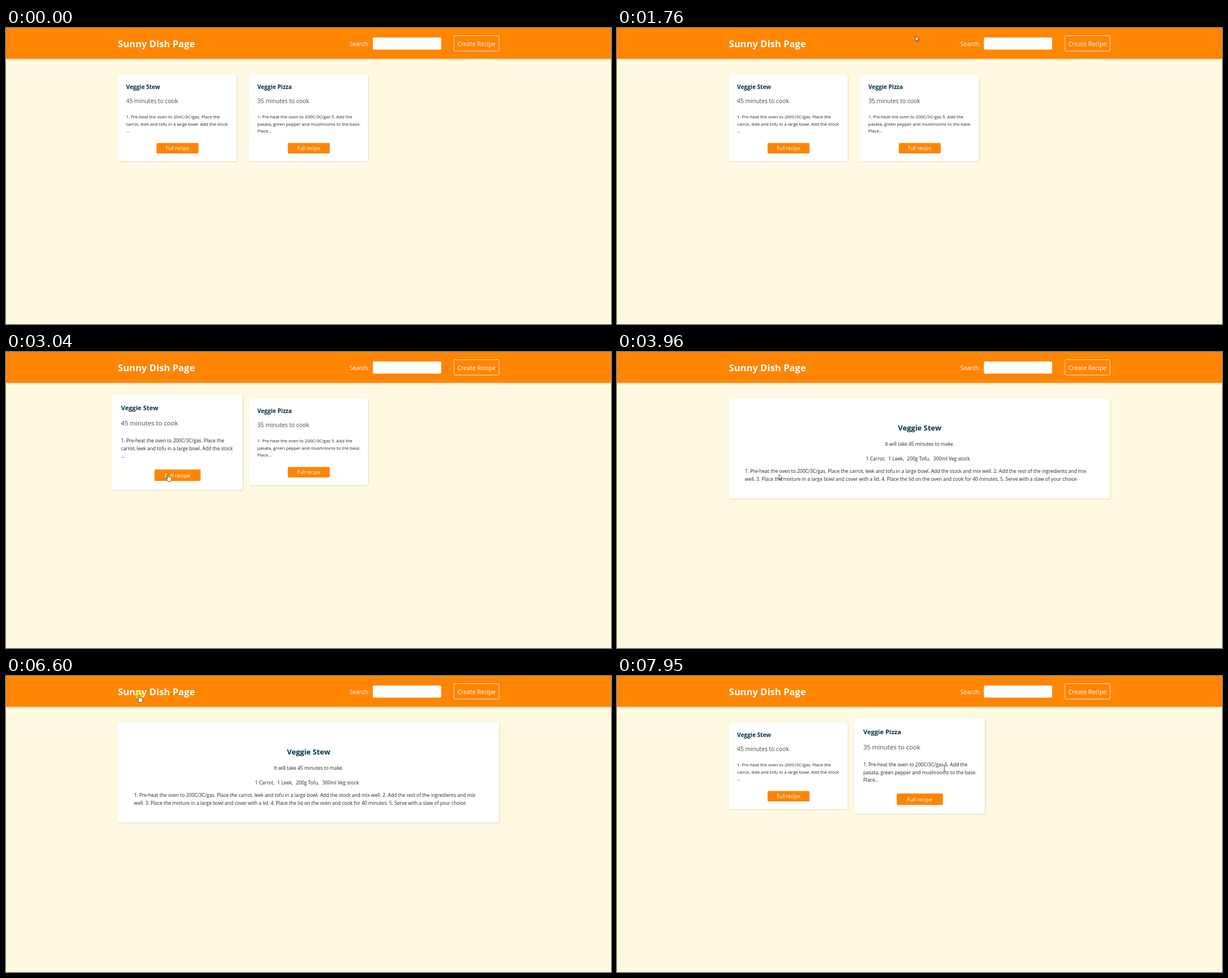
Recreate the animation shown at these times as an HTML page. Size 1068 px wide and 524 px high, loop 8 s.

```html
<!DOCTYPE html>
<html lang="en">
<head>
<meta charset="utf-8">
<title>Recipes</title>
<style>
html, body { margin: 0; width: 100%; height: 100%; overflow: hidden; background: #fef9e0; }
svg { display: block; width: 100%; height: 100%; font-family: "Open Sans", "Noto Sans", sans-serif; }
text { white-space: pre; }
.panel { fill: #fff; filter: drop-shadow(1px 1px 1.3px rgba(0, 0, 0, .13)); }
.bar { fill: #ff8503; filter: drop-shadow(0 1px 1px rgba(0, 0, 0, .1)); }
.white { fill: #fff; }
.heading { fill: #023047; font-weight: 700; }
.soft { fill: #484848; }
.body { fill: #222; }
</style>
</head>
<body>
<svg viewBox="0 0 1068 524" preserveAspectRatio="none">
  <rect width="1068" height="524" fill="#fef9e0"/>
  <rect class="bar" width="1068" height="54.6"/>
  <g class="white">
    <text x="197.5" y="34" font-size="16.6" font-weight="700">Sunny Dish Page</text>
    <text x="606.3" y="31.8" font-size="10.4">Search:</text>
    <rect x="647.6" y="16.7" width="120.6" height="21.6" rx="2"/>
    <text x="830.6" y="31.8" font-size="10.55" text-anchor="middle">Create Recipe</text>
  </g>
  <rect x="790.8" y="13.6" width="79.6" height="27.3" rx="1.8" fill="none" stroke="#fff" stroke-width=".8"/>
  <g id="list"></g>
  <g id="recipe">
    <rect id="sheet" class="panel" x="197.7" y="83" width="672.8" rx="2.5"/>
    <g id="details" class="body" font-size="8.5"></g>
  </g>
  <circle id="click" r="7" fill="#ffe000" opacity=".65"/>
  <g id="cursor" stroke-linejoin="round">
    <path id="arrow" d="M0 0V9.2L2.1 7.3L3.5 10.5L5 9.9L3.6 6.8H6.4Z" fill="#fff" stroke="#222" stroke-width=".75"/>
    <path id="hand" d="M-1 .8Q0 -.6 1 .8V4.5Q2.2 3.8 2.8 4.9Q4 4.3 4.5 5.4Q6 5 6 6.6V9.4Q5.6 11 5 12.8H-.2Q-1 11 -3.4 8.2Q-3.4 6.8 -1 8.4Z" fill="#fff" stroke="#222" stroke-width=".75"/>
    <path id="beam" d="M-2 -5H-.6L0 -4.5L.6 -5H2M0 -4.5V4.5M-2 5H-.6L0 4.5L.6 5H2" fill="none" stroke="#333" stroke-width=".85"/>
  </g>
</svg>
<script>
const LOOP = 8000;
const $ = id => document.getElementById(id);
const show = (node, on) => { node.style.display = on ? "" : "none"; };
const text = (x, y, content, attrs = "") => `<text x="${x}" y="${y}" ${attrs}>${content}</text>`;

function card(id, x, title, minutes, lines) {
  const left = x + 14.3;
  return `<g id="${id}">
    <rect class="panel" x="${x}" y="83" width="209.5" height="153" rx="2.5"/>
    ${text(left, 108.2, title, 'class="heading" font-size="10.15"')}
    ${text(left, 132.8, minutes + " minutes to cook", 'class="soft" font-size="10.3"')}
    ${lines.map((line, i) => text(left, 160.3 + i * 12.2, line, 'class="body" font-size="7.72"')).join("")}
    <rect x="${x + 68.1}" y="203.6" width="74" height="18.5" rx="1.7" fill="#ff8503"/>
    ${text(x + 104.9, 216.2, "Full recipe", 'class="white" font-size="8.6" text-anchor="middle"')}
  </g>`;
}

$("list").innerHTML =
  card("stew", 197.7, "Veggie Stew", 45, [
    "1. Pre-heat the oven to 200C/3C/gas. Place the",
    "carrot, leek and tofu in a large bowl. Add the stock",
    "..."]) +
  card("pizza", 429.4, "Veggie Pizza", 35, [
    "1. Pre-heat the oven to 200C/3C/gas 5. Add the",
    "pasata, green pepper and mushrooms to the base.",
    "Place..."]);

$("details").innerHTML =
  text(534.3, 139, "Veggie Stew", 'class="heading" font-size="12.95" text-anchor="middle"') +
  text(534.2, 166.3, "It will take 45 minutes to make.", 'text-anchor="middle"') +
  text(439.6, 191.6, "1 Carrot,") + text(479, 191.6, "1 Leek,") +
  text(511.8, 191.6, "200g Tofu,") + text(558.6, 191.6, "300ml Veg stock") +
  text(225.8, 213.6, "1. Pre-heat the oven to 200C/3C/gas. Place the carrot, leek and tofu in a large bowl. Add the stock and mix well. 2. Add the rest of the ingredients and mix") +
  text(225.8, 228.2, "well. 3. Place the mixture in a large bowl and cover with a lid. 4. Place the lid on the oven and cook for 40 minutes. 5. Serve with a slaw of your choice");

const arrow = () => "arrow";

// Each move jumps through evenly timed stops along a polyline, then rests.
const moves = [
  { start: 350, end: 550, stops: 5, path: [[1013, 497], [824, 243]], shape: arrow },
  { start: 880, end: 1280, stops: 9, path: [[815, 239], [504, 78]], shape: arrow },
  { start: 1470, end: 1520, stops: 2, path: [[512, 50], [532, 2]], shape: arrow },
  { start: 1570, hidden: true },
  { start: 1760, end: 2530, stops: 17, path: [[527, 14], [293, 177]], shape: arrow },
  { start: 2580, end: 3040, stops: 10, path: [[293, 180], [286, 216.5]],
    shape: (x, y, t) => y > 207 && t < 3580 ? "hand" : "arrow" },
  { start: 4860, end: 5010, stops: 4, path: [[262, 188], [130, 37]], shape: arrow },
  { start: 5360, end: 5970, stops: 14, path: [[128, 34], [122, 27], [150, 21], [200, 25], [235, 34]],
    shape: x => x > 197 ? "hand" : "arrow" },
  { start: 7360, end: 7950, stops: 13, path: [[237, 35], [578, 163]],
    shape: (x, y) => y < 41 ? "hand" : x > 435 && y > 150 ? "beam" : "arrow" }
];

// Hover growth as [time, amount] keys.
const hover = {
  stew: [[2130, 0], [2400, 1], [3580, 1], [3581, 0], [7480, 0], [7560, .15], [7640, 0]],
  pizza: [[1080, 0], [1200, .3], [1280, 0], [1960, 0], [2030, .15], [2120, 0], [7640, 0], [7880, 1]]
};

const smooth = p => p * p * (3 - 2 * p);

function along(path, p) {
  const q = p * (path.length - 1);
  const i = Math.min(Math.floor(q), path.length - 2);
  return [0, 1].map(k => path[i][k] + (path[i + 1][k] - path[i][k]) * (q - i));
}

function keyed(keys, t) {
  const i = keys.findIndex(key => key[0] > t);
  if (i === 0) return keys[0][1];
  if (i < 0) return keys[keys.length - 1][1];
  const [t0, a] = keys[i - 1], [t1, b] = keys[i];
  return a + (b - a) * (t - t0) / (t1 - t0);
}

function drawCursor(t) {
  const move = moves.filter(m => m.start <= t).pop();
  const visible = Boolean(move && !move.hidden);
  show($("cursor"), visible);
  if (!visible) return;
  const last = move.stops - 1;
  const stop = Math.min(last, Math.floor((t - move.start) / (move.end - move.start) * last + 1e-6));
  const [x, y] = along(move.path, smooth(stop / last));
  $("cursor").setAttribute("transform", `translate(${x} ${y})`);
  const shape = move.shape(x, y, t);
  for (const id of ["arrow", "hand", "beam"]) show($(id), id === shape);
}

function grow(id, cx, t) {
  const scale = 1 + .1 * keyed(hover[id], t);
  $(id).setAttribute("transform", `translate(${cx} 159.5) scale(${scale}) translate(${-cx} -159.5)`);
}

function draw(t) {
  show($("list"), t < 3580 || t >= 6850);
  grow("stew", 302.5, t);
  grow("pizza", 534.2, t);

  const loaded = t >= 3960;
  show($("recipe"), t >= 3630 && t < 6780);
  show($("details"), loaded);
  $("sheet").setAttribute("height", loaded ? 176.5 : 56);

  const first = t >= 3430 && t < 3580;
  show($("click"), first || t >= 6600 && t < 6780);
  $("click").setAttribute("transform", first ? "translate(286 216)" : "translate(235 34)");
  drawCursor(t);
}

const begin = performance.now();
function tick() {
  draw((performance.now() - begin) % LOOP);
  requestAnimationFrame(tick);
}
tick();
</script>
</body>
</html>
```
